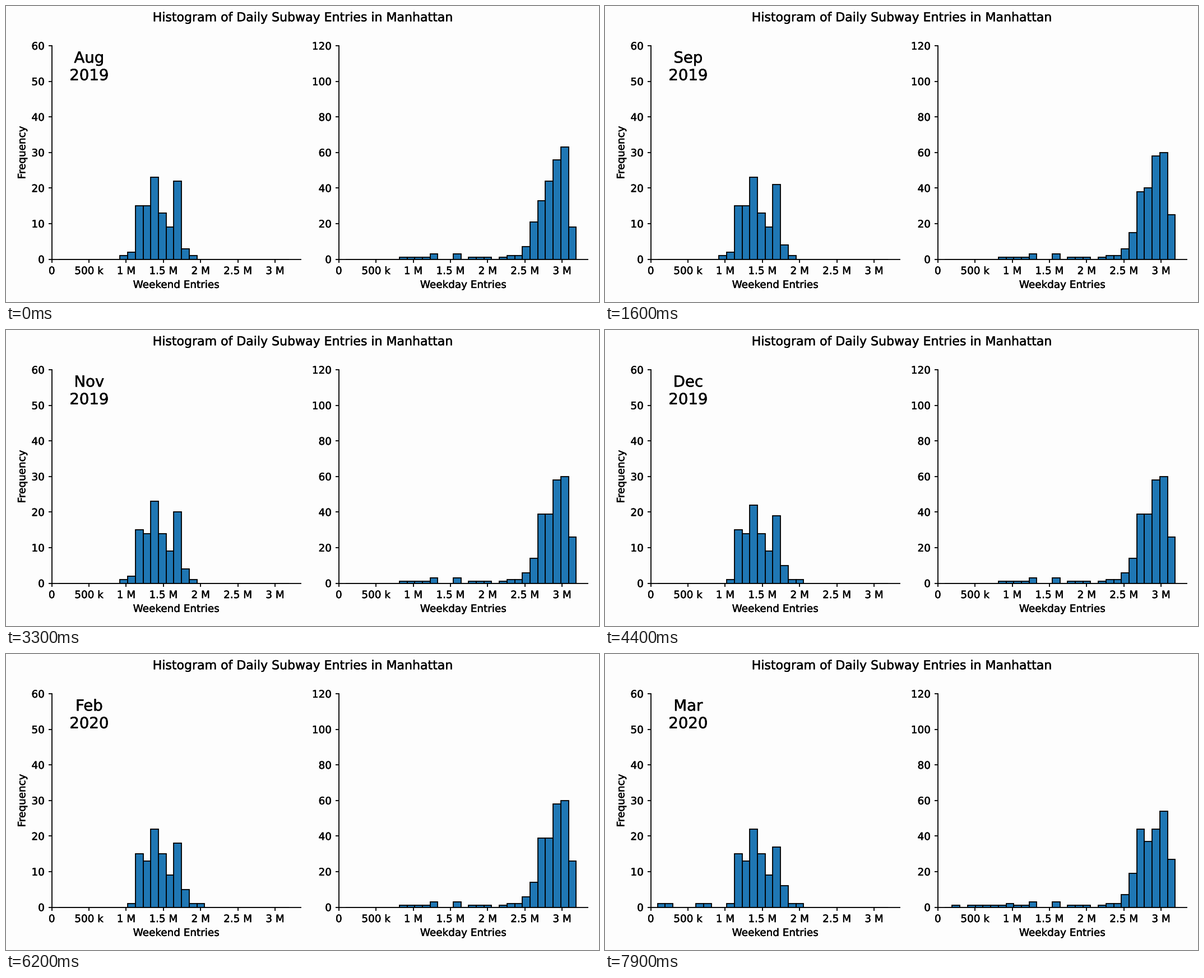
Animation of 1058x529 px, one loop 8000 ms. Source, as a matplotlib script:

```python
import numpy as np
import matplotlib.pyplot as plt
from matplotlib.animation import FuncAnimation
from matplotlib.patheffects import withStroke

W, H, DPI = 1058, 529, 132.25
FRAMES, INTERVAL = 80, 100
BINS = 30
LOW, HIGH = 0.09, 3.19          # histogram range, millions of entries
BIN_W = (HIGH - LOW) / BINS
FIRST_DAY = np.datetime64("2019-08-01")
DAYS_PER_FRAME = 3
MONTHS = "Jan Feb Mar Apr May Jun Jul Aug Sep Oct Nov Dec".split()

# Key shapes of the rolling year, blended over time.
WEEKEND_BIN = 8
WEEKEND_TIMES = [0, 79]
WEEKEND_SHAPES = [[1, 2, 15, 15, 23, 13, 9, 22, 3, 1, 0],
                  [0, 1, 15, 13, 22, 15, 9, 17, 6, 1, 1]]
PEAK_BIN = 23
PEAK_TIMES = [0, 18, 62, 79]
SETTLED = [6, 14, 39, 39, 58, 60, 26]
PEAK_SHAPES = [[7, 21, 33, 44, 56, 63, 18], SETTLED, SETTLED,
               [7, 19, 44, 37, 44, 54, 27]]
HOLIDAY_BIN = 7
HOLIDAYS = [1, 1, 1, 1, 3, 0, 0, 3, 0, 1, 1, 1, 0, 1, 2, 2]


def blend(frame, times, shapes):
    return [round(np.interp(frame, times, column)) for column in zip(*shapes)]


def shutdown_days(frame, weekend):
    """Bins of the days since the collapse, when entries decay day by day."""
    last = DAYS_PER_FRAME * (frame - FRAMES + 1) + 10
    for day in range(1, last + 1):
        if (day % 7 in (1, 2)) == weekend:
            entries = 0.95 * np.exp(-0.175 * (day - 3)) * (0.55 if weekend else 1)
            yield int((entries - LOW) / BIN_W)


def counts(frame, weekend):
    result = np.zeros(BINS, int)

    def place(first, values):
        result[first:first + len(values)] = values

    if weekend:
        place(WEEKEND_BIN, blend(frame, WEEKEND_TIMES, WEEKEND_SHAPES))
    else:
        place(HOLIDAY_BIN, HOLIDAYS)
        place(PEAK_BIN, blend(frame, PEAK_TIMES, PEAK_SHAPES))
    for b in shutdown_days(frame, weekend):
        result[b] += 1
    return result


def month_label(frame):
    year, month, _ = str(FIRST_DAY + DAYS_PER_FRAME * frame).split("-")
    return f"{MONTHS[int(month) - 1]}\n{year}"


def make_panel(left, top_count, xlabel):
    ax = fig.add_axes([left / W, (H - 452.6) / H, 444.1 / W, 381.5 / H],
                      facecolor="none")
    edges = LOW + BIN_W * np.arange(BINS)
    bars = ax.bar(edges, np.zeros(BINS), BIN_W, align="edge",
                  color="#1f77b4", edgecolor="black")
    ax.set_xlim(0, HIGH + 0.05 * (HIGH - LOW))
    ax.set_ylim(0, top_count)
    ax.set_xticks(np.arange(0, 3.1, 0.5),
                  ["0", "500 k", "1 M", "1.5 M", "2 M", "2.5 M", "3 M"])
    ax.set_yticks(range(0, top_count + 1, top_count // 6))
    ax.spines[["top", "right"]].set_visible(False)
    ax.set_xlabel(xlabel)
    return ax, bars


plt.rcParams.update({
    "font.family": "DejaVu Sans", "text.hinting": "none",
    "axes.linewidth": 1, "xtick.major.width": 1, "ytick.major.width": 1,
})
fig = plt.figure(figsize=(W / DPI, H / DPI), dpi=DPI, facecolor="#fdfdfd")
fig.suptitle("Histogram of Daily Subway Entries in Manhattan", fontsize=12)
weekend_ax, weekend_bars = make_panel(81.7, 60, "Weekend Entries")
weekday_ax, weekday_bars = make_panel(593.8, 120, "Weekday Entries")
weekend_ax.set_ylabel("Frequency")
label = weekend_ax.text(0.15, 0.9, "", transform=weekend_ax.transAxes,
                        ha="center", va="center", fontsize=15)

# A hairline outline gives the text its slightly heavy look.
for text in fig.findobj(plt.Text):
    text.set_path_effects([withStroke(linewidth=0.25, foreground="black")])


def update(frame):
    for bars, weekend in ((weekend_bars, True), (weekday_bars, False)):
        for bar, n in zip(bars, counts(frame, weekend)):
            bar.set_height(n)
    label.set_text(month_label(frame))
    return [*weekend_bars, *weekday_bars, label]


anim = FuncAnimation(fig, update, frames=FRAMES, interval=INTERVAL,
                     init_func=lambda: update(0), repeat=True, repeat_delay=0)
plt.show()
```
